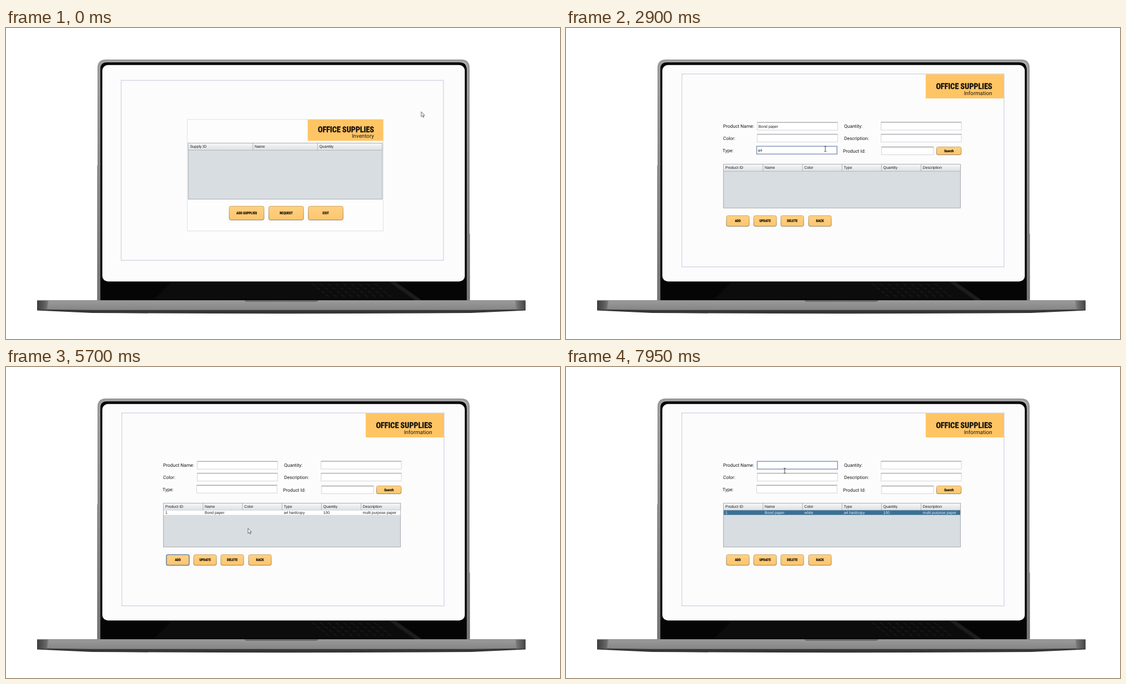
An HTML page that plays this animation: 998x561 px, repeating every 8000 ms.

```html
<!DOCTYPE html>
<html lang="en">
<head>
<meta charset="utf-8">
<title>Office supplies</title>
<style>
  html, body { margin: 0; width: 100%; height: 100%; overflow: hidden; background: #fff; }
  svg { display: block; width: 100%; height: 100%; }
  text { white-space: pre; text-rendering: geometricPrecision; fill: #1a1a1a; }
  .label { font: 8.4px Roboto, "Open Sans", sans-serif; }
  .sub { font: 9.8px Roboto, "Open Sans", sans-serif; text-anchor: end; }
  .cell { font: 6.85px "Liberation Sans", Arial, sans-serif; }
  .title, .btn { font-family: "Roboto Condensed", "Open Sans Condensed", Lato, sans-serif; font-weight: 700; font-stretch: condensed; }
  .title { font-size: 14.4px; letter-spacing: -.1px; text-anchor: end; fill: #111; stroke: #111; stroke-width: .3px; }
  .btn { font-size: 6.4px; letter-spacing: -.1px; text-anchor: middle; fill: #161208; stroke: #161208; stroke-width: .2px; }
</style>
</head>
<body>
<svg viewBox="0 0 998 561" xmlns="http://www.w3.org/2000/svg">
  <defs>
    <linearGradient id="lid" x2="0" y2="1">
      <stop offset="0" stop-color="#a0a0a0"/><stop offset=".45" stop-color="#8a8a8a"/><stop offset="1" stop-color="#747474"/>
    </linearGradient>
    <linearGradient id="base" x2="0" y2="1">
      <stop offset="0" stop-color="#9a9a9a"/><stop offset="1" stop-color="#858585"/>
    </linearGradient>
    <linearGradient id="endL"><stop offset="0" stop-color="#3c3c3c"/><stop offset=".8" stop-color="#686868"/><stop offset="1" stop-color="#8c8c8c"/></linearGradient>
    <linearGradient id="endR"><stop offset="0" stop-color="#aaa"/><stop offset=".3" stop-color="#747474"/><stop offset="1" stop-color="#444"/></linearGradient>
    <linearGradient id="head" x2="0" y2="1"><stop offset="0" stop-color="#f8f9fa"/><stop offset=".5" stop-color="#e9ebed"/><stop offset="1" stop-color="#dfe2e5"/></linearGradient>
    <linearGradient id="button" x2="0" y2="1"><stop offset="0" stop-color="#ffd083"/><stop offset="1" stop-color="#fdc66d"/></linearGradient>
    <linearGradient id="edge" x2="0" y2="1"><stop offset="0" stop-color="#cbab72"/><stop offset="1" stop-color="#8f7c58"/></linearGradient>
  </defs>

  <g id="laptop">
    <path d="M164.2 491V248H165V72Q165 57 180 57H820Q835 57 835 72V371H835.8V491Z" fill="url(#lid)"/>
    <path d="M165.4 248V72Q165.4 57.4 180 57.4H820Q834.6 57.4 834.6 72V371" fill="none" stroke="#808080" stroke-width=".8"/>
    <path d="M818 61L823 61Q830 63 831 72L828 75Z" fill="#c0c0c0"/>
    <path d="M170 491V74Q170 62 182 62H817Q830 62 830 75V491Z" fill="#050505"/>
    <path d="M298 458L268 489H735L690 458Z" fill="#0c0c0c"/>
    <path d="M690 458L737 491H749L702 458Z" fill="#1c1c1c"/>
    <g id="keys" stroke="#222" stroke-width="1.2"></g>
    <rect x="173.5" y="66.7" width="653" height="390.5" rx="10" fill="#fcfcfc"/>
    <path d="M56 507H936V509.5L838 514Q500 516.5 155 514L56 509.5Z" fill="#363636"/>
    <path d="M56 491.5H936V507.5L838 508.8H155L56 507.5Z" fill="url(#base)"/>
    <path d="M56 491.5H77L74 508.5L56 508Z" fill="url(#endL)"/>
    <path d="M914 491.5H936V508L920 508.5Z" fill="url(#endR)"/>
    <path d="M57 491.6H935" stroke="#777" stroke-width=".8"/>
    <path d="M429 491H563L560 494H432Z" fill="#6c6c6c"/>
  </g>

  <g id="inventory"></g>
  <g id="info"></g>
  <g id="arrow"><path d="M0 0V9L2.1 7.1 3.6 10.3 5 9.7 3.6 6.6H6.2Z" fill="#fff" stroke="#444" stroke-width=".8"/></g>
  <g id="beam"><path d="M-2-4.5H-.6L0-4L.6-4.5H2M0-4V4M-2 4.5H-.6L0 4L.6 4.5H2" fill="none" stroke="#333" stroke-width=".9"/></g>
</svg>

<script>
const byId = id => document.getElementById(id);
const inventory = byId('inventory'), info = byId('info');

function add(parent, tag, attrs, content) {
  const el = document.createElementNS('http://www.w3.org/2000/svg', tag);
  for (const key in attrs) el.setAttribute(key, attrs[key]);
  if (content !== undefined) el.textContent = content;
  parent.appendChild(el);
  return el;
}
const box = (parent, x, y, width, height, style) => add(parent, 'rect', { x, y, width, height, ...style });
const label = (parent, cls, x, y, content) => add(parent, 'text', { class: cls, x, y }, content);
const show = (el, on) => el.setAttribute('visibility', on ? 'visible' : 'hidden');

function banner(parent, x, y, w, h, margin, sub) {
  box(parent, x, y, w, h, { fill: '#ffc564' });
  label(parent, 'title', x + w - margin, y + h * .6, 'OFFICE SUPPLIES');
  label(parent, 'sub', x + w - margin, y + h * .86, sub);
}

function table(parent, x, y, w, h, names) {
  const step = w / names.length;
  box(parent, x, y, w, h, { fill: '#d8dde1', stroke: '#9da2a8', 'stroke-width': .9 });
  box(parent, x, y, w, 12.5, { fill: 'url(#head)', stroke: '#a6abb0', 'stroke-width': .8 });
  names.forEach((name, i) => {
    if (i) add(parent, 'path', { d: `M${x + i * step} ${y}v12.5`, stroke: '#a0a5aa', 'stroke-width': .8 });
    label(parent, 'cell', x + i * step + 3.2, y + 8.6, name);
  });
}

function button(parent, x, y, w, h, name) {
  const face = box(parent, x, y, w, h, { rx: 2.8, fill: 'url(#button)' });
  label(parent, 'btn', x + w / 2, y + h / 2 + 2.3, name);
  return on => {
    face.setAttribute('stroke', on ? '#6f8ba3' : 'url(#edge)');
    face.setAttribute('stroke-width', on ? 1.7 : 1);
  };
}

function field(x, y, w) {
  const frame = box(info, x, y, w, 14, { fill: '#fff' });
  const top = add(info, 'path', { d: `M${x} ${y}h${w}`, stroke: '#96989d', 'stroke-width': 1.1 });
  const text = label(info, 'cell', x + 2.3, y + 9.6, '');
  const caret = add(info, 'path', { stroke: '#222', 'stroke-width': .8 });
  return {
    hit: (px, py) => px > x && px < x + w && py > y - 4 && py < y + 18,
    draw(value, focused, blink) {
      text.textContent = value;
      frame.setAttribute('stroke', focused ? '#8c9fbe' : '#cfd0d4');
      frame.setAttribute('stroke-width', focused ? 1.6 : .9);
      show(top, !focused);
      show(caret, focused && blink);
      if (focused) caret.setAttribute('d', `M${x + 2.8 + (value ? text.getComputedTextLength() : 0)} ${y + 3}v8.2`);
    }
  };
}

// Keyboard reflected below the screen
for (let row = 0; row < 4; row++)
  for (let col = 0; col < 9; col++) {
    const x = 552 + col * 14 + row * 8, y = 462 + row * 6.5;
    add(byId('keys'), 'path', { d: `M${x} ${y}l6 3` });
  }

// Stock list
box(inventory, 207.5, 94.5, 580.5, 324.5, { fill: 'none', stroke: '#d9d9ec', 'stroke-width': 1.6 });
box(inventory, 326.5, 165, 353, 201, { fill: '#fdfdfd', stroke: '#e0e0e8', 'stroke-width': 1 });
banner(inventory, 543.5, 165, 136, 38.5, 16.5, 'Inventory');
table(inventory, 328.3, 207.8, 349.5, 101, ['Supply ID', 'Name', 'Quantity']);
['ADD SUPPLIES', 'REQUEST', 'EXIT'].forEach((name, i) =>
  button(inventory, 402.2 + i * 71.2, 321.5, 62.6, 24.8, name)(false));

// Product form
box(info, 208.7, 82.8, 580.5, 348, { fill: 'none', stroke: '#d9d9ec', 'stroke-width': 1.6 });
banner(info, 648, 83.5, 141, 43.5, 21.2, 'Information');
[['Product Name:', 283, 180], ['Color:', 283, 202], ['Type:', 282, 223.8],
 ['Quantity:', 501, 180], ['Description:', 501, 202], ['Product Id:', 499, 224.8]]
  .forEach(([name, x, y]) => label(info, 'label', x, y, name));
table(info, 283.7, 245.8, 427, 79, ['Product ID', 'Name', 'Color', 'Type', 'Quantity', 'Description']);

const row = add(info, 'g', {});
const rowFill = box(row, 284.2, 258.5, 426, 8.3, {});
const rowCells = [0, 1, 2, 3, 4, 5].map(i => label(row, 'cell', 286.9 + i * 71.17, 265, ''));

const fields = {
  name: field(344.5, 170.2, 144.7), color: field(344.5, 191.7, 144.7), type: field(343.5, 213.4, 144.7),
  qty: field(567.5, 170, 144.7), desc: field(567.5, 191.7, 144.7), pid: field(568.3, 214.6, 93.7)
};
const buttons = {
  add: button(info, 289, 338.5, 41, 19.2, 'ADD'),
  update: button(info, 338.1, 338.5, 41, 19.2, 'UPDATE'),
  remove: button(info, 387.1, 338.5, 41, 19.2, 'DELETE'),
  back: button(info, 437, 338.5, 41, 19.2, 'BACK'),
  search: button(info, 667.5, 214.5, 44.5, 14.2, 'Search')
};

// Timeline, in ms
const LOOP = 8000, OPEN = 600, SAVED = 5500, SELECTED = 5900, FOUND = 6450, UPDATED = 7650, CLEARED = 7750;

const pointer = [
  [100, 748, 151], [450, 433, 336], [600, 433, 336], [900, 410, 180], [1050, 405, 180], [1300, 386, 207],
  [1750, 386, 207], [2150, 400, 222], [2400, 400, 222], [2600, 466, 218], [3450, 470, 218], [3700, 600, 180],
  [3950, 600, 180], [4150, 600, 202], [5150, 600, 202], [5450, 312, 348], [5500, 312, 348], [5700, 436, 291],
  [5900, 440, 264], [6050, 440, 270], [6200, 610, 222], [6280, 610, 222], [6400, 688, 222], [6450, 688, 222],
  [6600, 528, 193], [6800, 430, 199], [7150, 430, 199], [7450, 358, 347], [7550, 358, 347], [7700, 364, 314],
  [7950, 394, 187]
];
const focusSteps = [[0, ''], [950, 'name'], [2200, 'type'], [3750, 'qty'], [4150, 'desc'], [5500, 'add'],
  [5900, ''], [6200, 'pid'], [6450, 'search'], [6800, 'color'], [7500, 'update'], [7700, ''], [7900, 'name']];
const typing = [['name', 'Bond paper', 1000, 50], ['type', 'a4', 2600, 80], ['type', ' hardcopy', 2950, 50],
  ['qty', '100', 3850, 60], ['desc', 'multi purpose ', 4190, 55], ['desc', 'paper', 5020, 25],
  ['pid', '1', 6300, 50], ['color', 'white', 6900, 50]];
const product = { pid: '1', name: 'Bond paper', color: '', type: 'a4 hardcopy', qty: '100', desc: 'multi purpose paper' };

function pointerAt(t) {
  const next = pointer.findIndex(p => p[0] > t);
  if (next === 0) return pointer[0].slice(1);
  if (next < 0) return pointer[pointer.length - 1].slice(1);
  const [t0, x0, y0] = pointer[next - 1], [t1, x1, y1] = pointer[next];
  const k = (t - t0) / (t1 - t0), e = k * k * (3 - 2 * k);
  return [x0 + (x1 - x0) * e, y0 + (y1 - y0) * e];
}

function valuesAt(t) {
  const values = { pid: '', name: '', color: '', type: '', qty: '', desc: '' };
  if (t >= CLEARED) return values;
  if (t >= FOUND) Object.assign(values, product);
  const since = t >= FOUND ? FOUND : t >= SAVED ? SAVED : 0;
  for (const [key, text, start, pace] of typing)
    if (start >= since && t >= start) values[key] += text.slice(0, 1 + Math.floor((t - start) / pace));
  return values;
}

function draw(t) {
  const opened = t >= OPEN;
  inventory.style.display = opened ? 'none' : '';
  info.style.display = opened ? '' : 'none';

  const [x, y] = pointerAt(t);
  const overField = opened && Object.values(fields).some(f => f.hit(x, y));
  for (const id of ['arrow', 'beam']) byId(id).setAttribute('transform', `translate(${x} ${y})`);
  show(byId('beam'), overField);
  show(byId('arrow'), !overField);
  if (!opened) return;

  const focus = focusSteps.filter(s => s[0] <= t).pop()[1];
  const values = valuesAt(t), blink = t % 1000 < 500;
  for (const key in fields) fields[key].draw(values[key], key === focus, blink);
  for (const key in buttons) buttons[key](key === focus);

  const selected = t >= SELECTED;
  row.style.display = t >= SAVED ? '' : 'none';
  rowFill.setAttribute('fill', selected ? '#3b7096' : '#fff');
  const cells = Object.values({ ...product, color: t >= UPDATED ? 'white' : '' });
  rowCells.forEach((cell, i) => {
    cell.textContent = cells[i];
    cell.style.fill = selected ? '#eef4f8' : '#1a1a1a';
  });
}

const began = performance.now();
function tick() {
  const t = (performance.now() - began) % LOOP;
  draw(Math.floor(t / 50) * 50);
  requestAnimationFrame(tick);
}
tick();
</script>
</body>
</html>
```
